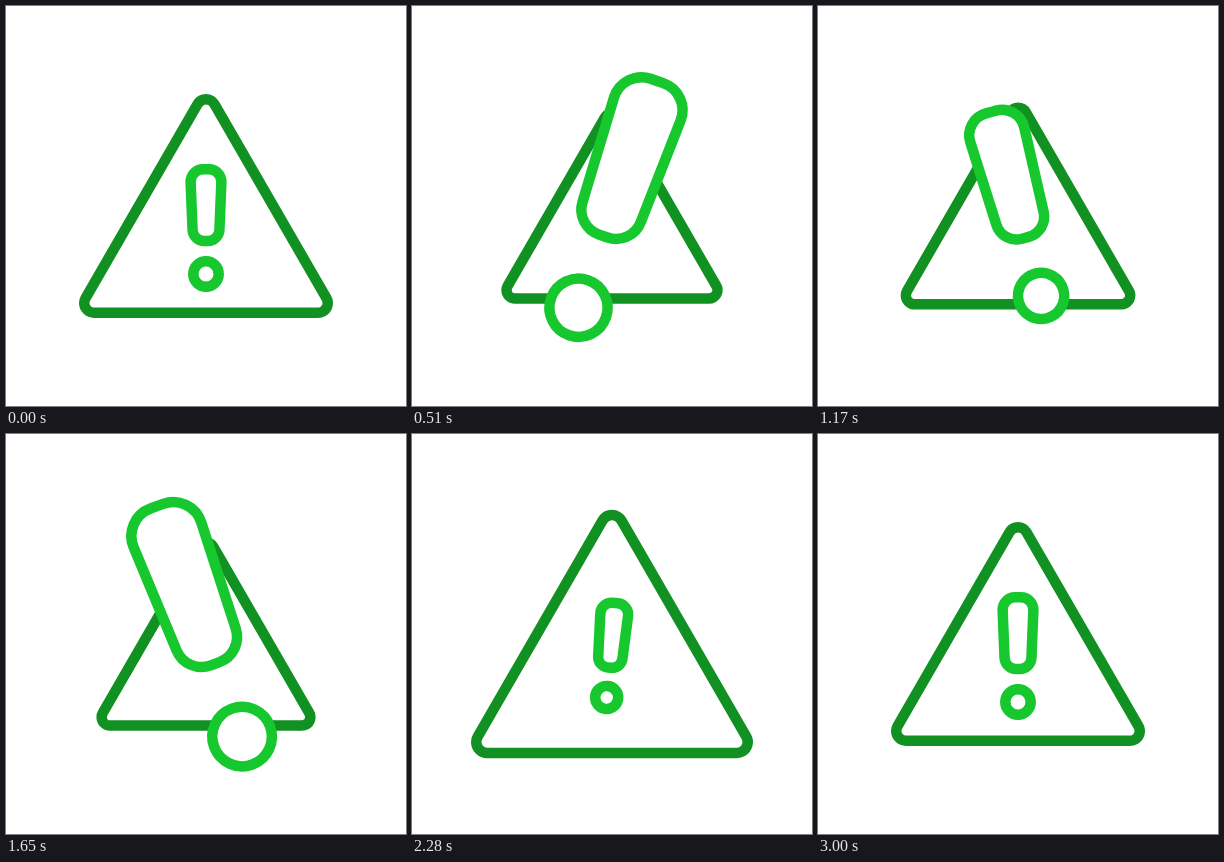
These frames come from a looping animation (400x400 px, 3.03 s). An HTML page with a canvas:

```html
<!DOCTYPE html>
<html lang="en">
<head>
<meta charset="utf-8">
<title>Warning sign</title>
<style>
  html, body { margin: 0; width: 100%; height: 100%; overflow: hidden; background: #fff; }
  canvas { display: block; width: 400px; height: 400px; }
</style>
</head>
<body>
<canvas id="stage" width="400" height="400"></canvas>
<script>
const ctx = document.getElementById('stage').getContext('2d');
const LOOP = 3030, STEP = 30;
const DARK = '#109121', LIGHT = '#16c72e';

// Moments of the swing, in ms.
const SWELL = 400, DIP = 940, PEAK = 1550, LAND = 2200, REST = 3000;

const rad = deg => deg * Math.PI / 180;

// Smooth 0 to 1 between two moments.
function ease(time, from, to) {
  const p = Math.min(1, Math.max(0, (time - from) / (to - from)));
  return (1 - Math.cos(Math.PI * p)) / 2;
}

// Grows until LAND, then swings out to zero at REST.
function rebound(time, from) {
  if (time < LAND) return ease(time, from, LAND);
  const p = Math.min(1, (time - LAND) / (REST - LAND));
  return (1 - p * p) ** 2 * Math.cos(0.9 * Math.PI * p);
}

// 1 while the mark is held large.
const hold = (time, release) => ease(time, 0, SWELL) - ease(time, release, LAND);

function pose(time) {
  const dip = ease(time, SWELL, DIP) - ease(time, DIP, PEAK);
  const swing = 1 - 2 * ease(time, SWELL, 1400);
  return {
    triangle: 1 - 0.143 * hold(time, 1750) + 0.093 * dip + 0.122 * rebound(time, 1750),
    size: 1 + 1.37 * hold(time, 1600) - 0.8 * dip - 0.1 * rebound(time, 1600),
    angle: 20.3 * swing * hold(time, 1690) + 5.5 * rebound(time, 1690)
  };
}

function outline(color, fill) {
  ctx.lineWidth = 10.5;
  ctx.strokeStyle = color;
  if (fill) {
    ctx.fillStyle = fill;
    ctx.fill();
  }
  ctx.stroke();
}

function drawTriangle(s) {
  const corner = (x, y, from) =>
    ctx.arc(x * s, y * s, 9.75 * s, rad(from), rad(from + 120));
  ctx.save();
  ctx.translate(200, 200);
  ctx.beginPath();
  corner(0, -97, -150);
  corner(112, 97, -30);
  corner(-112, 97, 90);
  ctx.closePath();
  outline(DARK);
  ctx.restore();
}

function drawMark(s, angle) {
  const top = -59.25 * s, bottom = 12.4 * s;
  const wide = 15.9 * s, narrow = 13 * s;
  ctx.save();
  ctx.translate(200, 205);
  ctx.rotate(rad(angle));
  // The mark slides up its own axis as it grows.
  ctx.translate(0, Math.min(17.5, 32.5 - 15 * s));

  ctx.beginPath();
  ctx.moveTo(0, top);
  ctx.arcTo(wide, top, narrow, bottom, 12.5 * s);
  ctx.arcTo(narrow, bottom, -narrow, bottom, 11.5 * s);
  ctx.arcTo(-narrow, bottom, -wide, top, 11.5 * s);
  ctx.arcTo(-wide, top, 0, top, 12.5 * s);
  ctx.closePath();
  outline(LIGHT, '#fff');

  ctx.beginPath();
  ctx.arc(0, 45.5 * s, 12.7 * s, 0, Math.PI * 2);
  outline(LIGHT, '#fff');
  ctx.restore();
}

function draw(time) {
  const { triangle, size, angle } = pose(time);
  ctx.fillStyle = '#fff';
  ctx.fillRect(0, 0, 400, 400);
  drawTriangle(triangle);
  drawMark(size, angle);
}

const start = performance.now();
function tick() {
  const time = (performance.now() - start) % LOOP;
  draw(Math.floor(time / STEP) * STEP);
  requestAnimationFrame(tick);
}
tick();
</script>
</body>
</html>
```
